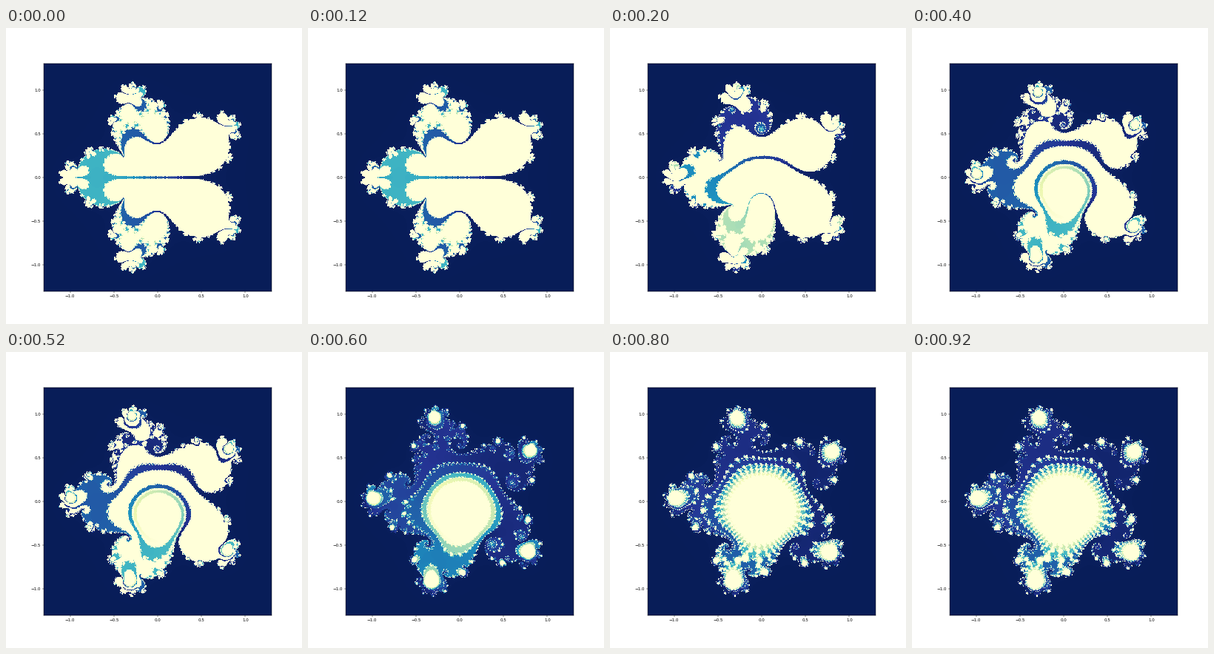
Write a matplotlib script that moves like this. It is 400 px wide and 400 px high and loops after 1 s.

```python
import matplotlib.pyplot as plt
import numpy as np
from matplotlib.animation import FuncAnimation

FRAMES, INTERVAL = 5, 200
EDGE, GRID, MAX_ITER = 1.3, 400, 200
SHIFT = 0.01
GROWTH = 1.002     # modulus of the multiplier, slightly repelling
TURN_STEP = 0.005  # turns added to the multiplier per frame


def escape_times(turn):
    """Escape counts of z -> z^6 + GROWTH exp(-2 pi i turn) z + SHIFT."""
    axis = np.linspace(-EDGE, EDGE, GRID)
    z = (axis[None, :] + 1j * axis[:, None]).ravel()
    multiplier = GROWTH * np.exp(-2j * np.pi * turn)
    counts = np.full(z.size, MAX_ITER)
    alive = np.arange(z.size)
    for n in range(MAX_ITER):
        square = z * z
        z = square * square * square + multiplier * z + SHIFT
        inside = np.abs(z) <= 2
        counts[alive[~inside]] = n
        alive, z = alive[inside], z[inside]
    return counts.reshape(GRID, GRID)


fig, ax = plt.subplots(figsize=(10, 10), dpi=40)
image = ax.imshow(np.zeros((GRID, GRID)), cmap="YlGnBu_r", vmin=0, vmax=MAX_ITER,
                  origin="lower", extent=(-EDGE, EDGE, -EDGE, EDGE),
                  interpolation="nearest")


def update(frame):
    image.set_data(escape_times(frame * TURN_STEP))
    return [image]


animation = FuncAnimation(fig, update, frames=FRAMES, interval=INTERVAL,
                          repeat=True, repeat_delay=0)
plt.show()
```
